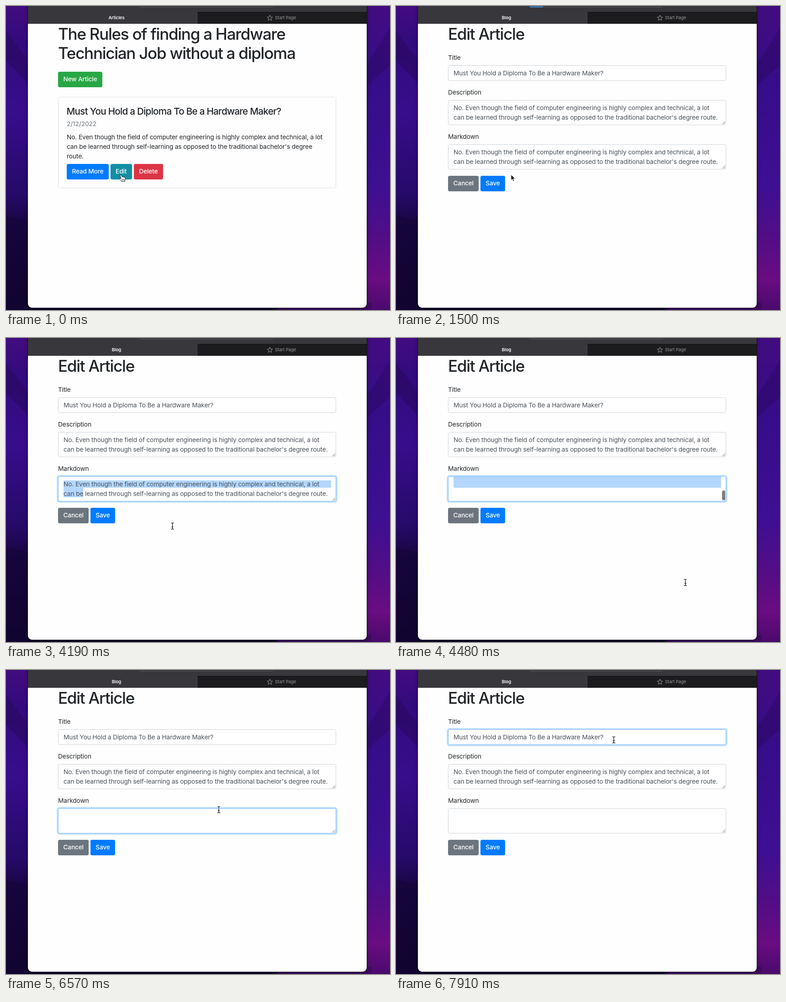
An HTML page for the animation above (8 s loop, 841 by 666 pixels).

```html
<!DOCTYPE html>
<html lang="en">
<head>
<meta charset="utf-8">
<title>Edit article</title>
<style>
  html, body { margin: 0; width: 100%; height: 100%; overflow: hidden; background: #1b0840; }
  * { box-sizing: border-box; }
  #stage { position: relative; width: 841px; height: 666px; overflow: hidden;
    font-family: Inter, "Liberation Sans", sans-serif; font-optical-sizing: none; }
  #stage div, #stage svg { position: absolute; }
  #wall { left: 0; top: 0; }
  #window { left: 48px; top: -20px; width: 742px; height: 680.5px; border-radius: 9px;
    background: #fefefe; overflow: hidden; box-shadow: 0 0 0 1px #16082b, 0 3px 10px rgba(0,0,0,.35); }
  #bar { left: 0; top: 0; width: 742px; height: 58.5px; background: #38373c; }
  #idle { left: 370px; top: 33px; width: 372px; height: 25.5px; background: #1c1c1e;
    border-left: 1px solid #4b4a4f; border-top: 1px solid #111113; }
  #address { left: 243px; top: 0; width: 295px; height: 22.5px; border: 1px solid #56555a; border-radius: 5px; }
  #load { left: 1px; bottom: -1px; height: 1.5px; background: #3d8fe0; }
  .text { white-space: pre; height: 20px; line-height: 20px; font-size: 13.74px;
    letter-spacing: -.0088em; color: #212529; }
  .h1 { font-size: 35px; font-weight: 500; letter-spacing: -.036em; }
  .h4 { font-size: 20.7px; font-weight: 500; letter-spacing: -.037em; }
  .muted { color: #6c757d; }
  .value { color: #495057; }
  .tab { font-size: 9.6px; letter-spacing: -.01em; color: #98979c; }
  .active { width: 120px; text-align: center; font-weight: 600; color: #fff; }
  .button { height: 33.6px; border-radius: 3.5px; line-height: 33.6px; text-align: center;
    font-weight: 450; letter-spacing: -.014em; color: #fff; }
  .field { left: 114px; width: 609px; background: #fff; border: 1px solid #ced4da; border-radius: 3.5px; }
  .card { left: 114px; top: 198.5px; width: 609px; height: 200px; border: 1px solid #dfdfdf; border-radius: 3.5px; }
  .ring { left: 114px; width: 609px; border: 1px solid #80bdff; border-radius: 3.5px;
    box-shadow: 0 0 0 2.8px rgba(0,123,255,.25); opacity: 0; }
  .select { left: 126px; background: #b3d7ff; }
  .caret { width: 1px; height: 16px; background: #111; }
  #thumb { left: 714px; top: 334px; width: 7px; height: 21px; border-radius: 3.5px; background: #7c7c7c; }
  .page { left: 0; top: 0; }
  .cursor { left: 0; top: 0; overflow: visible; }
</style>
</head>
<body>
<div id="stage">
  <svg id="wall" width="841" height="666">
    <defs>
      <linearGradient id="left" x2="0" y2="1">
        <stop offset="0" stop-color="#420c80"/><stop offset=".12" stop-color="#320b7c"/>
        <stop offset=".35" stop-color="#370d8c"/><stop offset=".62" stop-color="#260a68"/>
        <stop offset=".72" stop-color="#190640"/><stop offset="1" stop-color="#100428"/>
      </linearGradient>
      <linearGradient id="right" x2="0" y2="1">
        <stop offset="0" stop-color="#420c80"/><stop offset=".25" stop-color="#350d8a"/>
        <stop offset=".6" stop-color="#3e0f92"/><stop offset=".78" stop-color="#550d86"/>
        <stop offset=".9" stop-color="#6a0c82"/><stop offset="1" stop-color="#4a0a6c"/>
      </linearGradient>
    </defs>
    <path fill="url(#left)" d="M0 0H60V666H0z"/>
    <path fill="url(#right)" d="M780 0H841V666H780z"/>
    <path fill="#0f0429" d="M40 650H590V666H40z"/>
    <path fill="#3f0a60" d="M590 650H800V666H596z"/>
    <path fill="#220952" opacity=".4" d="M0 55L48 118V170L0 120z"/>
    <path fill="#150538" opacity=".5" d="M0 458L48 470V666H0z"/>
    <path fill="#270854" opacity=".35" d="M841 48V130L790 175V128z"/>
  </svg>
  <div id="window">
    <div id="bar">
      <div id="address"><div id="load"></div></div>
      <div id="idle"></div>
    </div>
  </div>
  <svg width="841" height="40"><path id="star" fill="none" stroke="#98979c" stroke-linejoin="round"/></svg>
  <div id="list" class="page"></div>
  <div id="form" class="page"></div>
  <svg id="hand" class="cursor" width="1" height="1">
    <path fill="#fff" stroke="#111" stroke-linejoin="round" d="M-3.8 -6.2C-2.8 -7.2 -1.8 -6.6 -1.4 -5.6L-.2 -2.5C.6 -3.3 1.8 -3 2.2 -2C3 -2.7 4.1 -2.3 4.5 -1.3C5.5 -1.8 6.5 -1 6.7 0C7.2 2.3 6.7 3.8 5.8 5V7.3H-1.5C-1.8 5.6 -4 4 -5.8 2C-6.7 .8 -5.4 -.3 -4.2 .4L-2.2 1.7L-4.3 -4.5Q-4.6 -5.6 -3.8 -6.2z"/>
    <path stroke="#111" stroke-width=".8" d="M0 1.8V5M2.1 1.8V5M4.2 1.8V5"/>
  </svg>
  <svg id="arrow" class="cursor" width="1" height="1">
    <path fill="#050505" stroke="#fff" stroke-linejoin="round" d="M0 0V12.4L2.8 9.8L4.8 14.2L7 13.2L5 9H9z"/>
  </svg>
  <svg id="beam" class="cursor" width="1" height="1">
    <g fill="none" stroke-linecap="round">
      <path stroke="#fff" stroke-width="2.8" d="M-3 -7Q0 -7 0 -5Q0 -7 3 -7M0 -5V5M-3 7Q0 7 0 5Q0 7 3 7M-1.7 1.8H1.7"/>
      <path stroke="#111" stroke-width="1.2" d="M-3 -7Q0 -7 0 -5Q0 -7 3 -7M0 -5V5M-3 7Q0 7 0 5Q0 7 3 7M-1.7 1.8H1.7"/>
    </g>
  </svg>
</div>
<script>
const LOOP = 8000;
const $ = id => document.getElementById(id);
const stage = $('stage'), list = $('list'), form = $('form');

function add(parent, cls, style = {}, text = '') {
  const el = document.createElement('div');
  el.className = cls;
  for (const k in style) el.style[k] = typeof style[k] === 'number' ? style[k] + 'px' : style[k];
  el.textContent = text;
  parent.append(el);
  return el;
}
const label = (parent, x, mid, text, cls = '') =>
  add(parent, 'text ' + cls, { left: x, top: mid - 10 }, text);
const button = (parent, x, y, width, color, text) =>
  add(parent, 'text button', { left: x, top: y, width, background: color }, text);
const show = (el, alpha) => { el.style.opacity = Number(alpha); };

const title = 'Must You Hold a Diploma To Be a Hardware Maker?';
const lead = 'No. Even though the field of computer engineering is highly complex and technical, a lot';
const rest = "can be learned through self-learning as opposed to the traditional bachelor's degree";

// Browser tabs
const tab = label(stage, 182, 26, '', 'tab active');
label(stage, 589, 26, 'Start Page', 'tab');
$('star').setAttribute('d', 'M' + Array.from({ length: 10 }, (_, i) => {
  const r = i % 2 ? 2.7 : 6.4, a = (i / 5 - .5) * Math.PI;
  return [578 + r * Math.cos(a), 26.3 + r * Math.sin(a)].map(n => n.toFixed(2));
}).join('L') + 'z');

// Article list
label(list, 114, 60.5, 'The Rules of finding a Hardware', 'h1');
label(list, 114, 103, 'Technician Job without a diploma', 'h1');
button(list, 114, 144, 97, '#28a745', 'New Article');
add(list, 'card');
label(list, 132.5, 230.5, title, 'h4');
label(list, 133, 258, '2/12/2022', 'muted');
[lead, rest, 'route.'].forEach((s, i) => label(list, 133, 286.5 + i * 21.24, s));
button(list, 133, 346.3, 92, '#007bff', 'Read More');
const edit = button(list, 228.7, 346.3, 47, '', 'Edit');
button(list, 279.7, 346.3, 64.5, '#dc3545', 'Delete');

// Edit form
function field(name, y, height) {
  label(form, 114, y - 17.5, name);
  add(form, 'field', { top: y, height });
  return add(form, 'ring', { top: y, height });
}
function grip(y) {
  form.insertAdjacentHTML('beforeend', `<svg style="left:714px;top:${y}px" width="8" height="8">
    <path d="M1 7L7 1M4.5 7L7 4.5" stroke="#555" stroke-width=".9"/></svg>`);
}
function body(parent, y) {
  label(parent, 126, y, lead, 'value');
  label(parent, 126, y + 21.2, rest + ' route.', 'value');
}
label(form, 114, 60.5, 'Edit Article', 'h1');
const titleRing = field('Title', 130, 33.6);
const titleText = label(form, 126, 147, title, 'value');
const titleCaret = add(titleText, 'caret', { right: -1, top: 2 });
field('Description', 206, 55);
body(form, 223);
const markRing = field('Markdown', 303, 55);
const firstSel = add(form, 'select');
const nextSel = add(form, 'select', { top: 328, height: 21 });
const markdown = add(form, 'page');
body(markdown, 320.2);
const markCaret = add(form, 'caret', { left: 126, top: 312 });
const thumb = add(form, '');
thumb.id = 'thumb';
grip(252);
grip(349);
button(form, 114, 372, 67.3, '#6c757d', 'Cancel');
button(form, 185, 372, 54, '#007bff', 'Save');

// Each row: start time, then the values held until the next row
const pointer = [
  [0, 'hand', 254.5, 377], [1500, 'arrow', 252, 369.5], [1650, 'arrow', 250, 368],
  [1800, 'arrow', 238, 361], [1950, 'beam', 210, 346], [2100, 'beam', 178, 331],
  [2250, 'beam', 152, 320], [2400, 'beam', 139, 314], [2550, 'beam', 134.5, 313],
  [3150, 'beam', 132, 314], [3300, 'beam', 129, 316], [3450, 'beam', 127, 319],
  [3600, 'beam', 131, 332], [3740, 'beam', 145, 338], [3890, 'beam', 167, 346],
  [4040, 'beam', 243, 373], [4190, 'beam', 364.5, 412], [4340, 'beam', 530, 481],
  [4480, 'beam', 633.7, 535.5], [5680, 'arrow', 633, 535], [6270, 'arrow', 618, 508],
  [6420, 'arrow', 546, 404], [6570, 'beam', 466, 306], [6710, 'beam', 458, 236],
  [6860, 'beam', 465, 186], [7010, 'beam', 473, 162], [7160, 'beam', 476, 155],
  [7310, 'beam', 477, 153]
];
const progress = [[0, 0], [1500, 29], [1650, 58], [1800, 98], [1950, 148],
  [2100, 205], [2250, 262], [2400, 292], [2550, 0]];
const selection = [[0, 0, 0], [3600, 586, 4], [3740, 586, 18], [3890, 586, 42.5],
  [4340, 586, 579], [4480, 586, 0], [5980, 0, 0]];
const markFocus = [[0, 0], [2850, .8], [3000, 1], [7460, .4], [7610, 0]];
const titleFocus = [[0, 0], [7460, .6], [7610, 1]];
const scrollbar = [[0, 0], [4480, 1], [5080, .5], [5230, 0]];
const markBlink = [[0, 0], [5980, 1], [6570, 0], [7010, 1], [7460, 0]];
const titleBlink = [[0, 0], [7460, 1], [7910, 0]];

const at = (rows, t) => rows.findLast(row => row[0] <= t).slice(1);
const cursors = ['hand', 'arrow', 'beam'].map($);

function draw(t) {
  const editing = t >= 1500;
  list.style.display = editing ? 'none' : '';
  form.style.display = editing ? '' : 'none';
  tab.textContent = editing ? 'Blog' : 'Articles';
  edit.style.background = t < 150 ? '#138fa5' : '#117a8b';
  $('load').style.width = at(progress, t)[0] + 'px';

  const [kind, x, y] = at(pointer, t);
  for (const c of cursors) show(c, c.id === kind);
  $(kind).style.transform = `translate(${x}px, ${y}px)`;

  const scrolled = t >= 4480;
  const [first, next] = at(selection, t);
  firstSel.style.top = (scrolled ? 304 : 311.5) + 'px';
  firstSel.style.height = (scrolled ? 23.5 : 16.5) + 'px';
  firstSel.style.width = first + 'px';
  nextSel.style.width = next + 'px';
  show(markdown, !scrolled);
  show(thumb, at(scrollbar, t)[0]);
  show(markRing, at(markFocus, t)[0]);
  show(titleRing, at(titleFocus, t)[0]);
  show(markCaret, at(markBlink, t)[0]);
  show(titleCaret, at(titleBlink, t)[0]);
}

const start = performance.now();
function tick() {
  draw((performance.now() - start) % LOOP);
  requestAnimationFrame(tick);
}
tick();
</script>
</body>
</html>
```
